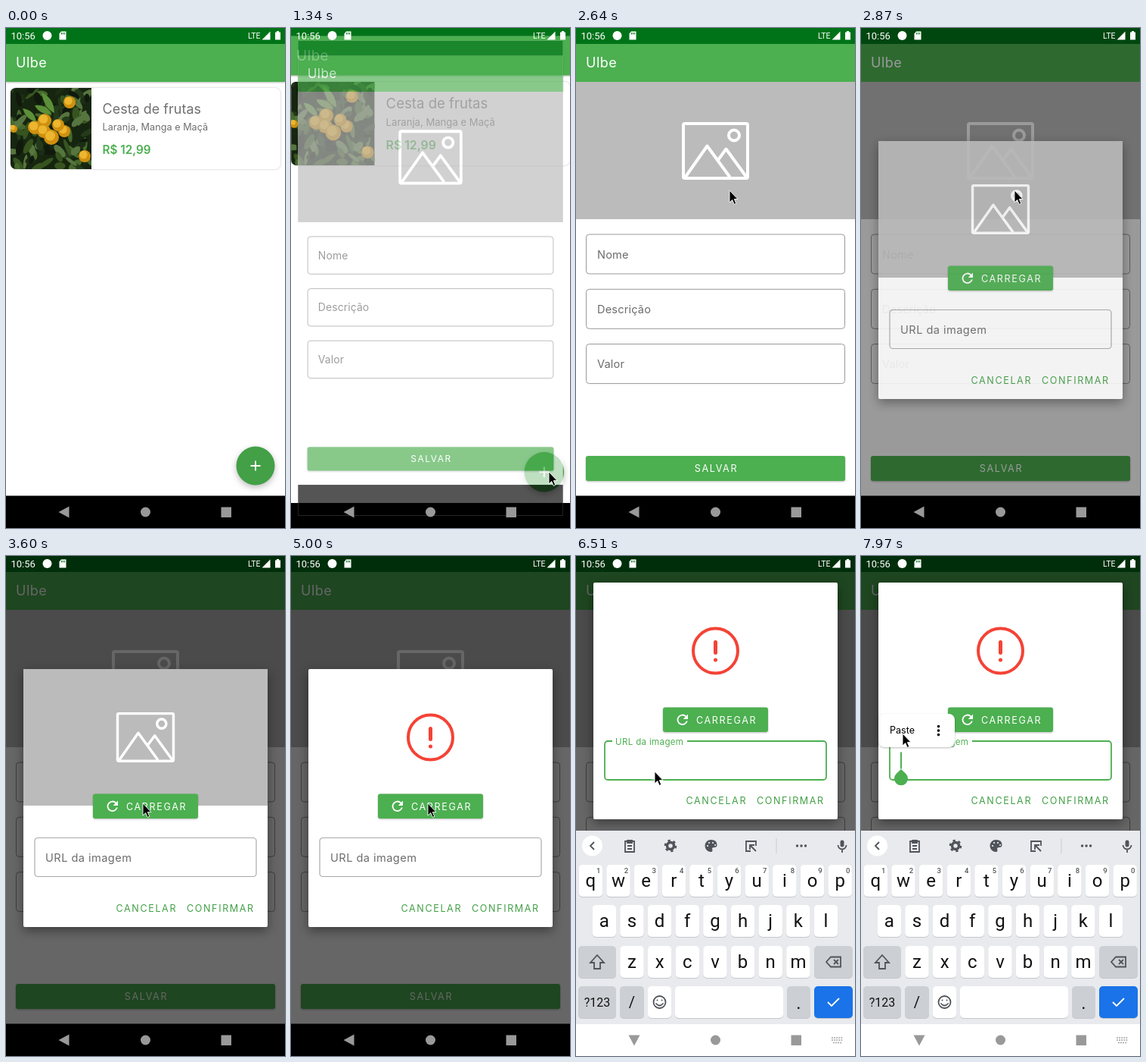
An HTML page for the animation above (8000 ms loop, 369 by 659 pixels).

```html
<!DOCTYPE html>
<html lang="pt">
<head>
<meta charset="utf-8">
<style>
html, body { margin: 0; width: 100%; height: 100%; overflow: hidden; background: #fff; }
svg { display: block; }
text { font-family: Inter, sans-serif; }
.hint { font-size: 14.6px; letter-spacing: .15px; fill: #6c6c6c; }
.btn { font-size: 12.6px; font-weight: 400; letter-spacing: 1.6px; }
.key { font: 24px Roboto, sans-serif; text-anchor: middle; fill: #111; }
.sup { font: 500 9.5px Roboto, sans-serif; text-anchor: middle; fill: #555; }
.line { fill: none; stroke: #50545a; stroke-width: 1.8; }
.shade { filter: drop-shadow(0 1px 1px #0004); }
</style>
</head>
<body>
<svg id="stage" width="369" height="659" viewBox="0 0 369 659">
  <defs>
    <clipPath id="cardClip"><rect x="6" y="79" width="357" height="107" rx="7"/></clipPath>
    <clipPath id="photoClip"><rect x="6" y="79" width="107" height="107"/></clipPath>
    <g id="bars">
      <rect width="369" height="659" fill="#fff"/>
      <rect y="21" width="369" height="50" fill="#4caf50" class="shade"/>
      <rect width="369" height="21" fill="#007318"/>
      <rect y="616.500" width="369" height="42.500"/>
      <text x="13" y="52" font-size="18" letter-spacing=".5" fill="#fff">Ulbe</text>
    </g>
    <g id="picture" fill="none" stroke="#fff" stroke-width="4" stroke-linejoin="round">
      <rect x="-42.5" y="-35.5" width="85" height="72" rx="2"/>
      <circle cx="24.5" cy="-20" r="7"/>
      <path d="M-40 35L-11-6 19 35M3 13L14-2 41 35"/>
    </g>
  </defs>

  <g id="list">
    <use href="#bars"/>
    <rect x="6" y="79" width="357" height="107" rx="7" fill="#fff" style="filter:drop-shadow(0 .5px 1px #0004)"/>
    <g clip-path="url(#cardClip)"><g id="photo" clip-path="url(#photoClip)"></g></g>
    <text x="127.500" y="113" font-size="18" fill="#707070">Cesta de frutas</text>
    <text x="127.500" y="135" font-size="12.700" fill="#707070">Laranja, Manga e Maçã</text>
    <text x="127.500" y="165.500" font-size="15.300" font-weight="600" fill="#4caf50">R$ 12,99</text>
    <circle cx="330" cy="577" r="25.500" fill="#43a047" style="filter:drop-shadow(0 3px 4px #0004)"/>
    <path d="M323.500 577h13M330 570.500v13" stroke="#fff" stroke-width="1.800"/>
  </g>

  <g id="form">
    <use href="#bars"/>
    <rect y="71" width="369" height="181" fill="#bbb"/>
    <use href="#picture" x="184.500" y="161.500"/>
    <g id="fields"></g>
    <rect x="13" y="564" width="343" height="33" rx="3" fill="#4caf50" class="shade"/>
    <text x="185.500" y="585" class="btn" fill="#fff" text-anchor="middle">SALVAR</text>
  </g>

  <rect id="scrim" width="369" height="659"/>

  <g id="dialog">
    <rect id="paper" x="23" width="323" rx="2" fill="#fff" style="filter:drop-shadow(0 5px 7px #0006)"/>
    <svg id="body" width="369" overflow="hidden">
      <g id="top">
        <g id="empty">
          <rect x="23" width="323" height="180" fill="#bbb"/>
          <use href="#picture" transform="translate(184.500 89.500) scale(.87)"/>
        </g>
        <g id="error" fill="none" stroke="#f44336" stroke-width="4">
          <circle cx="184.500" cy="90" r="29.500"/>
          <path d="M184.500 78.500v14M184.500 102v.1" stroke-width="5" stroke-linecap="round"/>
        </g>
        <rect x="115" y="164.500" width="139" height="32.500" rx="3" fill="#4caf50" class="shade"/>
        <rect id="ripple" x="115" y="164.500" width="139" height="32.500" rx="3" fill="#fff"/>
        <path transform="translate(130 170) scale(.9)" fill="#fff" d="M17.650 6.350A8 8 0 1 0 19.730 14h-2.080A6 6 0 1 1 16.220 7.780L13 11h7V4z"/>
        <text x="159" y="185.500" class="btn" fill="#fff">CARREGAR</text>
      </g>
      <g id="input">
        <rect id="border" x="38" y=".5" width="293" height="51" rx="4" fill="none"/>
        <rect id="notch" x="48" y="-2" width="99" height="5" fill="#fff"/>
        <text id="label" class="hint" style="letter-spacing:.45px">URL da imagem</text>
        <rect id="caret" x="52" y="15" width="2" height="22" fill="#4caf50"/>
      </g>
      <g id="actions" class="btn" fill="#43a047">
        <text x="145.500">CANCELAR</text>
        <text x="239">CONFIRMAR</text>
      </g>
    </svg>
  </g>

  <g id="keyboard"></g>

  <g fill="#fff">
    <text x="6.500" y="15" style="font:13px Roboto,sans-serif">10:56</text>
    <circle cx="54.500" cy="10" r="6"/>
    <path d="M73 4.500h6.500v11h-9v-8z"/>
    <path d="M73.500 6v2.500M75.500 6v2.500M77.500 6v2.500" stroke="#007318"/>
    <text x="320" y="14" style="font:10.500px Roboto,sans-serif">LTE</text>
    <path d="M349.500 4.500v11h-11zM356 5.500h2v-1.500h3v1.500h2v10h-7z"/>
  </g>
  <g fill="#999">
    <path id="back" d="M-7.500 0L6.500-7.500v15z"/>
    <circle cx="184.500" cy="638" r="6.500"/>
    <rect x="284.500" y="631.500" width="13.500" height="13.500"/>
    <path id="switch" d="M338 635h15M338 638h15M340 641.500h11" stroke="#999" stroke-width="1.600" stroke-dasharray="1.800 1.300"/>
  </g>

  <g id="paste">
    <path d="M53 281l6.400 6a9 9 0 1 1-12.800 0z" fill="#4caf50"/>
    <rect x="23" y="208" width="101" height="44" rx="8" fill="#fff" class="shade"/>
    <text x="38" y="234" font-size="12.600">Paste</text>
    <path d="M102.500 224.500v.1M102.500 230v.1M102.500 235.500v.1" stroke="#000" stroke-width="3.600" stroke-linecap="round"/>
  </g>
  <g id="cursor">
    <circle id="press" r="11.500" fill="#fff"/>
    <path d="M0 0V16L3.700 12.600 6.200 18.400 8.800 17.300 6.300 11.600H11Z" stroke="#fff" stroke-width=".9"/>
  </g>
</svg>
<script>
const $ = id => document.getElementById(id);
const set = (id, attrs) => { for (const k in attrs) $(id).setAttribute(k, attrs[k]); };
const show = (id, on) => set(id, { visibility: on ? 'visible' : 'hidden' });
const clamp = x => Math.max(0, Math.min(1, x));
const mix = (a, b, p) => a + (b - a) * p;
const span = (t, a, b) => clamp((t - a) / (b - a));
const out = (x, n = 3) => 1 - (1 - x) ** n;
const smooth = x => x * x * (3 - 2 * x);

function drawPhoto() {
  let seed = 11, s = '<rect x="6" y="79" width="107" height="107" fill="#16250f"/>';
  const rnd = () => (seed = seed * 16807 % 2147483647) / 2147483647;
  const greens = ['#243a1b', '#37541f', '#1b2d14', '#47692c', '#10190c', '#56753f'];
  for (let i = 0; i < 110; i++) {
    const x = 6 + rnd() * 107, y = 79 + rnd() * 107;
    s += `<ellipse rx="${5 + rnd() * 7}" ry="${2 + rnd() * 3}" fill="${greens[i % 6]}" transform="translate(${x} ${y}) rotate(${rnd() * 180})"/>`;
  }
  for (const [x, y, r] of [[84, 98, 8], [10, 133, 5], [51, 122, 9], [77, 136, 8], [69, 128, 8], [38, 131, 9], [50, 136, 9], [60, 144, 10], [104, 169, 8]])
    s += `<circle cx="${x}" cy="${y}" r="${r}" fill="#d0900f"/><circle cx="${x - 1.5}" cy="${y - 2}" r="${r * .65}" fill="#ecb62f"/>`;
  s += '<path d="M64 112q-14-7-17-27q17 8 17 27zM60 114q-16 0-22-12q16-2 22 12zM40 124q-14-4-18-18q16 2 18 18z" fill="#5c9038"/>';
  $('photo').innerHTML = s;
}

function drawFields() {
  $('fields').innerHTML = ['Nome', 'Descrição', 'Valor'].map((name, i) => {
    const y = 272 + i * 72.3;
    return `<rect x="13.5" y="${y}" width="342" height="52" rx="4" fill="none" stroke="#999"/>
      <text x="28" y="${y + 31.5}" class="hint">${name}</text>`;
  }).join('');
}

function drawKeyboard() {
  const key = (x, y, w, fill = '#fff') =>
    `<rect x="${x}" y="${y + 1}" width="${w}" height="42" rx="5" fill="#c4c7cb"/><rect x="${x}" y="${y}" width="${w}" height="42" rx="5" fill="${fill}"/>`;
  const gray = '#cccfd4';
  let s = '<rect y="362" width="369" height="297" fill="#e8eaed"/><rect y="617" width="369" height="42" fill="#fff"/>';
  [['qwertyuiop', 19.3, 407], ['asdfghjkl', 37.3, 460], ['zxcvbnm', 74, 514]].forEach(([row, x0, y], r) =>
    [...row].forEach((c, i) => {
      const x = x0 + i * 36.65;
      s += key(x - 15.7, y, 31.4) + `<text class="key" x="${x}" y="${y + 29}">${c}</text>`;
      if (!r) s += `<text class="sup" x="${x + 10.5}" y="${y + 11}">${(i + 1) % 10}</text>`;
    }));
  s += key(3, 514, 50, gray) + key(315, 514, 51, gray) + key(3, 567, 50, gray) + key(58, 567, 32, gray)
    + key(95, 567, 31) + key(131, 567, 143) + key(279, 567, 31, gray) + key(315, 567, 51, '#1a73e8');
  s += `<text class="key" style="font-size:16px" x="28" y="594">?123</text>
    <text class="key" style="font-size:20px" x="74" y="595">/</text><text class="key" x="294.500" y="597">.</text>
    <circle cx="21.500" cy="382" r="13.500" fill="#fff"/>
    <g class="line">
      <path d="M24 377l-5 5 5 5M28 526l9 10h-5v8h-8v-8h-5zM331 535l6-6.500h13v13h-13zM341 532l6 6M347 532l-6 6"/>
      <path d="M65 376h12v14h-12zM68 375h6v3h-6zM68 382h6M68 386h6"/>
      <circle cx="125" cy="382" r="4.500" stroke-width="3.500"/>
      <circle cx="125" cy="382" r="7" stroke-width="2.500" stroke-dasharray="3.300 4"/>
      <path d="M238 382v-6h-13v13h6M230 381l8 8M230 387v-6h6"/>
      <path d="M346.500 381a5.500 5.500 0 0 0 11 0M352 387v4"/>
      <path d="M352 377v4" stroke-width="5" stroke-linecap="round"/>
      <circle cx="110.500" cy="588" r="8"/><path d="M106 590q4.500 5 9 0M107.500 585.500h.1M113.500 585.500h.1" stroke-linecap="round"/>
      <path d="M265 372v20" stroke="#ccc" stroke-width="1"/>
      <path d="M333 588l5 5 10-10" stroke="#fff"/>
    </g>
    <path d="M178.500 374a8 8 0 1 0 0 16q3 0 1.500-4q0-2 3-2q3.500 0 3.500-3q0-7-8-7z" fill="#50545a"/>
    <path d="M174 382h.1M176 378h.1M181 378h.1M184 381h.1" stroke="#e8eaed" stroke-width="2.200" stroke-linecap="round"/>
    <path d="M292.500 382h.1M298 382h.1M303.500 382h.1" stroke="#50545a" stroke-width="3.400" stroke-linecap="round"/>`;
  $('keyboard').innerHTML = s;
}

// Each stop: time, x, y; equal neighbours make a pause
const path = [[600, 369, 400], [1050, 341, 585], [1750, 341, 585], [2300, 203, 214], [3210, 203, 214], [3600, 181, 326],
  [5000, 181, 326], [5350, 142, 388], [5900, 142, 388], [6270, 104, 284], [7430, 104, 284], [7900, 55, 234]];
const presses = [[1140, 1240], [2500, 2640], [4300, 4420], [5480, 5580], [6410, 7310]];

function cursorAt(t) {
  let i = 0;
  while (i < path.length - 2 && t >= path[i + 1][0]) i++;
  const [a, x, y] = path[i], [b, u, v] = path[i + 1], p = smooth(span(t, a, b));
  return [mix(x, u, p), mix(y, v, p)];
}

const zoom = k => `translate(184.5 329.5) scale(${k}) translate(-184.5 -329.5)`;

function drawDialog(t) {
  show('dialog', t >= 2810);
  set('scrim', { opacity: .6 * out(span(t, 2810, 2940), 1.7) });
  set('dialog', { opacity: out(span(t, 2810, 2940), 3.4) });

  const raised = t >= 5820, up = out(span(t, 5820, 5880)), settle = smooth(span(t, 5950, 6120));
  const y = mix(mix(149, 19, up), 35, settle);
  const h = raised ? mix(293, 312, settle) : 340;
  const scroll = raised ? mix(18.5, 0, settle) : 0;
  set('paper', { y, height: h });
  set('body', { y, height: h });
  set('top', { transform: `translate(0 ${-scroll})` });
  set('input', { transform: `translate(0 ${(raised ? 208.5 : 222) - scroll})` });
  set('actions', { transform: `translate(0 ${h - 20.5})` });

  const loaded = span(t, 4450, 4560);
  set('empty', { opacity: 1 - loaded });
  set('error', { opacity: loaded });
  set('ripple', { opacity: t >= 4300 ? .24 * span(t, 4300, 4380) * (1 - span(t, 4450, 4710)) : 0 });

  const f = smooth(span(t, 5560, 5720)), focused = t >= 5560;
  set('border', { stroke: focused ? '#4caf50' : '#aaa', 'stroke-width': focused ? 1.8 : 1.2 });
  show('notch', f > .5 && t >= 2810);
  set('label', { transform: `translate(52 ${mix(31.5, 5, f)}) scale(${mix(1, .79, f)})` });
  $('label').style.fill = focused ? '#4caf50' : '#6c6c6c';
  set('caret', { opacity: t >= 7310 || t >= 5580 && (t - 5580) % 1000 < 500 ? 1 : 0 });
}

function draw(t) {
  const p = out(span(t, 1244, 1562));
  set('list', { transform: zoom(1 + .05 * p) });
  set('form', { transform: zoom(.85 + .15 * p), opacity: p });
  drawDialog(t);

  show('keyboard', t >= 5700);
  set('keyboard', { transform: `translate(0 ${297 * (1 - out(span(t, 5700, 6066)))})` });
  set('back', { transform: `translate(77 638) rotate(${-90 * smooth(span(t, 5900, 6100))})` });
  set('switch', { opacity: span(t, 5800, 6000) });

  show('paste', t >= 7310);
  set('paste', { opacity: span(t, 7290, 7430) });
  show('cursor', t >= 600);
  set('cursor', { transform: `translate(${cursorAt(t)})` });
  set('press', { opacity: presses.some(([a, b]) => t >= a && t < b) ? .4 : 0 });
}

drawPhoto();
drawFields();
drawKeyboard();
const start = performance.now();
function tick() {
  draw((performance.now() - start) % 8000);
  requestAnimationFrame(tick);
}
tick();
</script>
</body>
</html>
```
